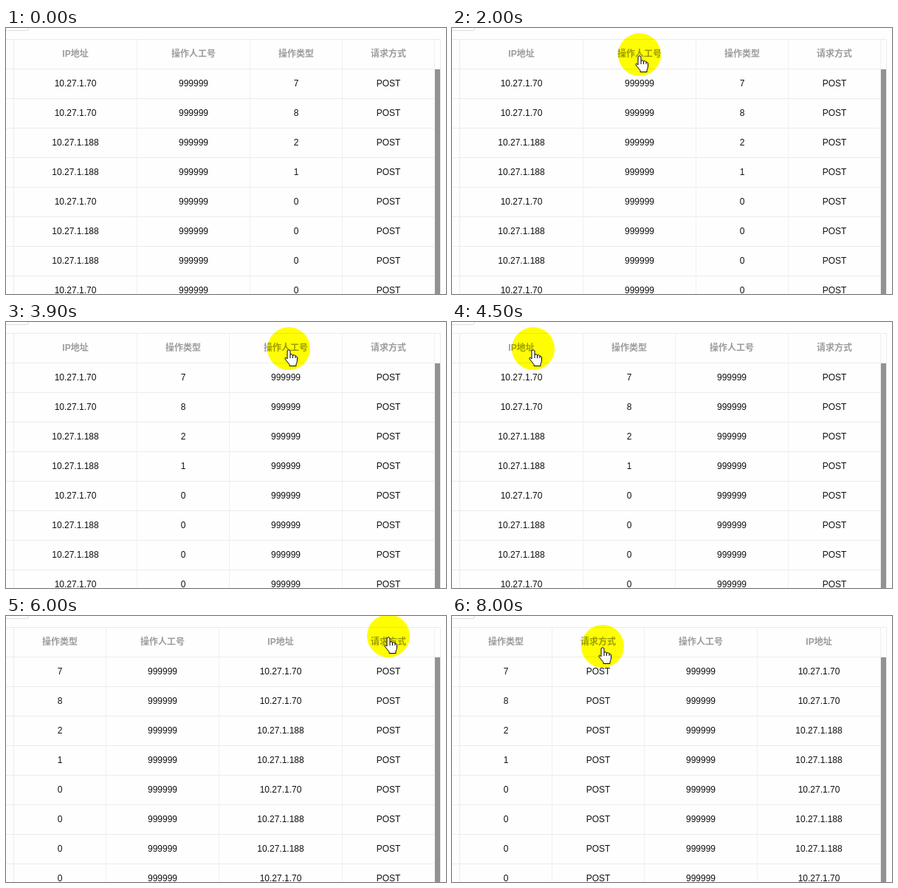
Animation, 596 px wide and 360 px high, one loop 8100 ms. Source, as an HTML page:

```html
<!DOCTYPE html>
<html lang="zh-CN">
<head>
<meta charset="utf-8">
<title>列拖拽排序</title>
<style>
html, body { margin: 0; width: 100%; height: 100%; overflow: hidden; background: #fefefe; }
#stage {
  position: relative; width: 596px; height: 360px; overflow: hidden; isolation: isolate;
  background: #fefefe; font: 12px "Liberation Sans", "Noto Sans CJK SC", sans-serif; color: #111;
}
#stage > * { position: absolute; }
.line { background: #ebebeb; }
.col { top: 16px; height: 344px; text-align: center; border-right: 1px solid #f0f0f0; }
.col.drag { background: #f2f2f2; }
.cell { height: 39px; line-height: 39px; border-bottom: 1px solid #ebebeb; white-space: nowrap; }
.head { font-weight: bold; color: #9c9c9c; }
#button { left: -10px; top: -20px; width: 39px; height: 22px; border: 1px solid #dedede; border-radius: 3px; }
#bar { left: 581px; top: 56px; width: 7px; height: 304px; background: #929292; }
#drop {
  top: 16px; width: 2px; height: 344px;
  background: repeating-linear-gradient(transparent 0 2px, #555 2px 4px);
}
#halo {
  left: -29px; top: -29px; width: 58px; height: 58px; border-radius: 50%;
  background: #ff0; mix-blend-mode: multiply;
}
#cursor { left: 0; top: 0; width: 1px; height: 1px; overflow: visible; }
#cursor g { fill: #fff; stroke: #000; stroke-linejoin: round; }
</style>
</head>
<body>
<div id="stage">
  <div id="button"></div>
  <div id="bar"></div>
  <div id="drop"></div>
  <div id="halo"></div>
  <svg id="cursor">
    <defs>
      <path id="block" d="M1 1H5V5H1Z" fill="#c5281c" stroke="#5a1208"/>
      <path id="arm" d="M-1.5-1V-6.5H-5L0-11.5L5-6.5H1.5V-1"/>
    </defs>
    <g id="arrow"><path d="M.5 .5V16.5L4 13L7 19L9 18L7 12H12Z"/></g>
    <g id="hand" transform="translate(-1 1)">
      <path d="M-1 13V2Q1-1 3 2V7Q6 6 6.5 8Q9 7 10 9Q12 9 12.5 11V15Q12 18 11 20V22.5H2V20.5L-4 13Q-4 9-1 13Z"/>
      <path d="M3 7V12M6.5 8V12M10 9V12" fill="none"/>
    </g>
    <g id="move"></g>
  </svg>
</div>
<script>
const LOOP = 8100, STEP = 100, LEFT = 11;
const $ = id => document.getElementById(id);
const stage = $("stage");

const columns = {
  ip: { title: "IP地址", width: 167, rows: [70, 70, 188, 188, 70, 188, 188, 70].map(n => "10.27.1." + n) },
  staff: { title: "操作人工号", width: 153, rows: Array(8).fill("999999") },
  type: { title: "操作类型", width: 125, rows: [7, 8, 2, 1, 0, 0, 0, 0] },
  method: { title: "请求方式", width: 125, rows: Array(8).fill("POST") }
};

// Each drag moves one column to a new index.
const drags = [
  { from: 2300, to: 3600, col: "staff", index: 2 },
  { from: 4600, to: 5500, col: "ip", index: 2 },
  { from: 6300, to: 7600, col: "method", index: 1 }
];

// Pointer stops, eased in between
const stops = [
  { t: 1200, x: 301, y: -9 },
  { t: 2000, x: 254, y: 36 },
  { t: 2300, x: 254, y: 36 },
  { t: 3600, x: 406, y: 37 },
  { t: 3900, x: 383, y: 36 },
  { t: 4600, x: 94, y: 36 },
  { t: 5350, x: 406, y: 43 },
  { t: 6000, x: 518, y: 27 },
  { t: 6300, x: 518, y: 36 },
  { t: 7600, x: 204, y: 41 },
  { t: LOOP, x: 204, y: 41 }
];

function add(cls, parent = stage, text = "") {
  const el = document.createElement("div");
  el.className = cls;
  el.textContent = text;
  parent.append(el);
  return el;
}

function line(x, y, w, h) {
  const el = add("line");
  el.style.cssText = `left:${x}px;top:${y}px;width:${w}px;height:${h}px`;
  stage.prepend(el);
}

line(0, 15, 589, 1);
line(580, 55, 9, 1);
line(10, 15, 1, 345);
line(588, 15, 1, 345);
for (let y = 55; y < 360; y += 40) line(0, y, 10, 1);

for (const col of Object.values(columns)) {
  col.el = add("col");
  col.el.style.width = col.width - 1 + "px";
  add("cell head", col.el, col.title);
  col.rows.forEach(value => add("cell", col.el, value));
  stage.prepend(col.el);
}

// The move pointer repeats one block and one arm four times.
$("move").innerHTML = ["block", "arm"].flatMap(id =>
  [0, 90, 180, 270].map(a => `<use href="#${id}" transform="rotate(${a})"/>`)).join("");

const ease = k => k * k * (3 - 2 * k);

function pointerAt(t) {
  const i = stops.findIndex(s => s.t > t);
  if (i < 1) return null;
  const a = stops[i - 1], b = stops[i];
  const k = ease((t - a.t) / (b.t - a.t));
  return { x: Math.round(a.x + (b.x - a.x) * k), y: Math.round(a.y + (b.y - a.y) * k) };
}

function orderAt(t) {
  let order = Object.keys(columns);
  for (const { to, col, index } of drags) {
    if (t < to) break;
    order = order.filter(key => key !== col);
    order.splice(index, 0, col);
  }
  return order;
}

// Gap nearest to the pointer, or null beside the dragged column itself
function dropEdge(order, name, x) {
  let edge = LEFT, gap = 0;
  for (const key of order) {
    if (x < edge + columns[key].width / 2) break;
    edge += columns[key].width;
    gap++;
  }
  const own = order.indexOf(name);
  return gap === own || gap === own + 1 ? null : edge;
}

function show(el, on) { el.style.display = on ? "" : "none"; }

function draw(t) {
  const order = orderAt(t), pos = pointerAt(t);
  const drag = drags.find(d => t >= d.from && t < d.to);

  let left = LEFT;
  for (const key of order) {
    const { el, width } = columns[key];
    el.style.left = left + "px";
    el.classList.toggle("drag", drag?.col === key);
    left += width;
  }

  const edge = drag ? dropEdge(order, drag.col, pos.x) : null;
  show($("drop"), edge !== null);
  $("drop").style.left = edge - 2 + "px";

  show($("halo"), pos);
  show($("cursor"), pos);
  if (!pos) return;
  const kind = drag ? "move" : pos.y > 15 ? "hand" : "arrow";
  for (const id of ["halo", "cursor"]) $(id).style.transform = `translate(${pos.x}px, ${pos.y}px)`;
  for (const id of ["arrow", "hand", "move"]) show($(id), id === kind);
}

const start = performance.now();
function tick() {
  const t = (performance.now() - start) % LOOP;
  draw(Math.floor(t / STEP) * STEP);
  requestAnimationFrame(tick);
}
tick();
</script>
</body>
</html>
```
